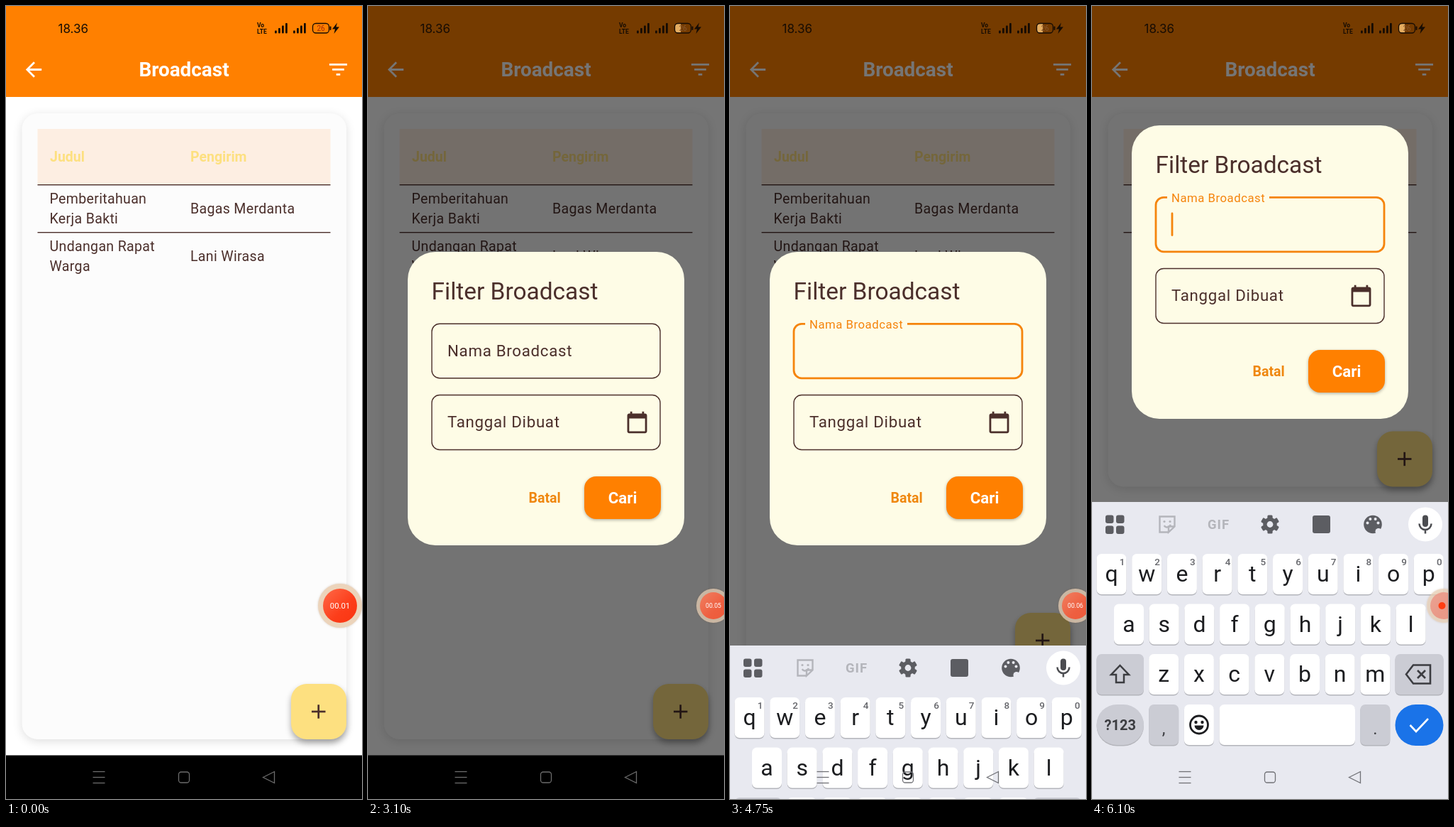
These frames come from a looping animation (502 px wide and 1116 px high, 8 s). An HTML page with a canvas:

```html
<!DOCTYPE html>
<html lang="id">
<head>
<meta charset="utf-8">
<title>Broadcast</title>
<style>
html, body { margin: 0; width: 100%; height: 100%; overflow: hidden; background: #fff; }
canvas { display: block; width: 100vw; height: 100vh; }
</style>
</head>
<body>
<canvas id="stage"></canvas>
<script>
const W = 502, H = 1116, LOOP = 8000, STEP = 50;
const DP = W / 360;
const BROWN = '#4b2f2b', ORANGE = '#ff8000', ACCENT = '#f5840c', YELLOW = '#fde080';
const KEY_GRAY = '#cbccd4', ICON = '#5c5d62', ICON_OFF = '#b4b5bb';

const canvas = document.getElementById('stage');
const dpr = window.devicePixelRatio || 1;
canvas.width = W * dpr;
canvas.height = H * dpr;
const c = canvas.getContext('2d');

const icons = {
  back: new Path2D('M20 11H7.83l5.59-5.59L12 4l-8 8 8 8 1.41-1.41L7.83 13H20v-2z'),
  filter: new Path2D('M10 18h4v-2h-4v2zM3 6v2h18V6H3zm3 7h12v-2H6v2z'),
  calendar: new Path2D('M20 3h-1V1h-2v2H7V1H5v2H4c-1.1 0-2 .9-2 2v16c0 1.1.9 2 2 2h16c1.1 0 2-.9 2-2V5c0-1.1-.9-2-2-2zm0 18H4V8h16v13z')
};

const clamp = v => Math.max(0, Math.min(1, v));
const mix = (a, b, p) => a + (b - a) * p;
const easeOut = p => 1 - (1 - p) ** 3;
const span = (t, a, b) => clamp((t - a) / (b - a));

// Piecewise linear value through [time, value] points.
function track(t, points) {
  let [t0, v0] = points[0];
  for (const [t1, v1] of points) {
    if (t < t1) return t1 === t0 ? v0 : mix(v0, v1, clamp((t - t0) / (t1 - t0)));
    [t0, v0] = [t1, v1];
  }
  return v0;
}

function text(str, x, y, size, color, { weight = 400, gap = 0, align = 'left', font = 'Roboto' } = {}) {
  c.font = `${weight} ${size}px ${font}, sans-serif`;
  c.letterSpacing = gap + 'px';
  c.textAlign = align;
  c.fillStyle = color;
  c.fillText(str, x, y);
}

function box(x, y, w, h, r, color) {
  c.fillStyle = color;
  c.beginPath();
  c.roundRect(x, y, w, h, r);
  c.fill();
}

function shadowBox(x, y, w, h, r, color, dy, blur, alpha) {
  c.save();
  c.shadowColor = `rgba(0,0,0,${alpha})`;
  c.shadowBlur = blur * dpr;
  c.shadowOffsetY = dy * dpr;
  box(x, y, w, h, r, color);
  c.restore();
}

function frame(x, y, w, h, r, color, width) {
  c.strokeStyle = color;
  c.lineWidth = width;
  c.beginPath();
  c.roundRect(x, y, w, h, r);
  c.stroke();
}

function disc(x, y, r, color) {
  c.fillStyle = color;
  c.beginPath();
  c.arc(x, y, r, 0, Math.PI * 2);
  c.fill();
}

function line(points, color, width, close) {
  c.strokeStyle = color;
  c.lineWidth = width;
  c.beginPath();
  points.forEach(([x, y]) => c.lineTo(x, y));
  if (close) c.closePath();
  c.stroke();
}

function icon(path, cx, cy, color) {
  c.save();
  c.translate(cx, cy);
  c.scale(DP, DP);
  c.translate(-12, -12);
  c.fillStyle = color;
  c.fill(path);
  c.restore();
}

function drawPage(t, shift) {
  c.fillStyle = '#fff';
  c.fillRect(0, 0, W, H);
  c.fillStyle = ORANGE;
  c.fillRect(0, 0, W, 128);
  if (t >= 1550 && t < 1700) {
    disc(468, 90, 27, 'rgba(255,255,255,.05)');
    disc(461, 99, 9, 'rgba(255,255,255,.14)');
  }
  icon(icons.back, 39, 89.5, '#fff');
  icon(icons.filter, 468.5, 89.3, '#fff');
  text('Broadcast', W / 2, 99, 20 * DP, '#fff', { weight: 700, align: 'center' });

  shadowBox(22.5, 151, 457.5, 881 + shift, 22, '#fcfcfc', 3, 14, 0.13);
  c.fillStyle = '#fdeee2';
  c.fillRect(44.5, 173, 413, 78);
  c.fillStyle = BROWN;
  c.fillRect(44.5, 251, 413, 1.4);
  c.fillRect(44.5, 318, 413, 1.4);

  const size = 14 * DP;
  text('Judul', 62, 219, size, YELLOW, { weight: 700 });
  text('Pengirim', 260, 219, size, YELLOW, { weight: 700 });
  const cell = (str, x, y) => text(str, x, y, size, BROWN, { gap: 0.25 * DP });
  cell('Pemberitahuan', 61.5, 278);
  cell('Kerja Bakti', 61.5, 306);
  cell('Bagas Merdanta', 260, 292);
  cell('Undangan Rapat', 61.5, 345);
  cell('Warga', 61.5, 373);
  cell('Lani Wirasa', 260, 359);

  const y = 993 + shift;
  shadowBox(402, y - 39, 78, 78, 22, YELLOW, 5, 9, 0.33);
  line([[431, y], [450.5, y]], BROWN, 2.7);
  line([[440.7, y - 9.7], [440.7, y + 9.7]], BROWN, 2.7);
}

function drawStatus(dimmed) {
  const ink = '#160c04';
  text('18.36', 73.5, 37.5, 17, ink, { font: 'Inter' });
  text('Vo', 354, 30, 8.5, ink, { weight: 700 });
  text('LTE', 354, 39, 8.5, ink, { weight: 700 });
  for (const x of [379, 405])
    for (let i = 0; i < 4; i++) {
      const h = 4 + i * 3.5;
      box(x + i * 5, 38.5 - h, 2.8, h, 1, ink);
    }
  if (dimmed) box(433, 25, 8, 12.5, [4, 0, 0, 4], '#e5ad60');
  frame(432.5, 24.5, 23, 13.5, 4.5, ink, 1.3);
  box(456.5, 28.5, 2, 5.5, 1, ink);
  text('26', 444, 35, 10, dimmed ? '#8a5a32' : '#a72a05', { align: 'center' });
  c.fillStyle = ink;
  c.beginPath();
  [[467, 23.5], [460, 32.5], [464, 32.5], [462.5, 39], [470, 29.5], [465.5, 29.5]].forEach(p => c.lineTo(...p));
  c.fill();
}

function drawNav(color) {
  for (const y of [1077.5, 1085.5, 1093.5]) line([[122.5, y], [139.5, y]], color, 1.3);
  frame(243.5, 1078, 15, 15, 3.5, color, 1.3);
  line([[362.5, 1085.5], [378.5, 1077.5], [378.5, 1093.5]], color, 1.3, true);
}

function drawDialog(t, shift) {
  c.save();
  c.translate(0, shift);
  box(56, 346, 390, 413, 39, '#fefce6');
  text('Filter Broadcast', 89.5, 413, 24 * DP, BROWN);

  const focus = easeOut(span(t, 4150, 4350));
  const active = focus > 0;
  frame(90, 447.3, 322, 76.5, 11, active ? ACCENT : BROWN, active ? 2.8 : 1.4);
  if (active) {
    const half = 72 * focus;
    c.fillStyle = '#fefce6';
    c.fillRect(178 - half, 445, half * 2, 5);
  }
  const scale = mix(1, 0.75, focus);
  text('Nama Broadcast', 112, mix(492.5, 453.5, focus), 16 * DP * scale, active ? ACCENT : BROWN,
    { gap: 0.5 * DP * scale });

  const on = (t >= 4250 && t < 4750) || (t >= 5100 && t < 5600) || t >= 6100;
  if (on) box(111.6, 468.5, 2.8, 33.5, 1.4, ACCENT);

  frame(90, 547.5, 322, 77, 11, BROWN, 1.4);
  text('Tanggal Dibuat', 112, 593, 16 * DP, BROWN, { gap: 0.5 * DP });
  icon(icons.calendar, 379.5, 586, BROWN);

  text('Batal', 226.5, 699, 14 * DP, '#ef870f', { weight: 700 });
  shadowBox(305, 662, 108, 60, 16.7, ORANGE, 1.5, 4, 0.3);
  text('Cari', 359, 699.5, 16 * DP, '#fff', { weight: 700, align: 'center' });
  c.restore();
}

function key(x, y, w, color = '#fff', r = 7) {
  box(x, y + 1.5, w, 57, r, '#b4b5bb');
  box(x, y, w, 57, r, color);
}

function drawToolbar() {
  const y = 31.5;
  for (const dx of [-13, 2]) for (const dy of [-13, 2]) box(32 + dx, y + dy, 11.5, 11.5, 3, ICON);

  line([[108, y + 11], [95.5, y + 11], [95.5, y - 11], [116.5, y - 11], [116.5, y + 3], [108, y + 11], [108, y + 3], [116.5, y + 3]], ICON_OFF, 2.4);
  disc(102, y - 4, 1.6, ICON_OFF);
  disc(110, y - 4, 1.6, ICON_OFF);
  c.beginPath();
  c.arc(106, y - 1, 5, 0.3, 2.6);
  c.stroke();

  text('GIF', 178.5, y + 6.5, 18.5, ICON_OFF, { weight: 700, gap: 1, align: 'center' });

  c.save();
  c.translate(251, y);
  for (let i = 0; i < 6; i++) {
    c.rotate(Math.PI / 3);
    box(-3.6, -13, 7.2, 8, 1.5, ICON);
  }
  c.restore();
  disc(251, y, 9.8, ICON);
  disc(251, y, 4.4, '#e8e9f0');

  box(311, y - 12.5, 25, 25, 3, ICON);

  disc(396, y, 12.8, ICON);
  disc(404, y + 10, 4.5, '#e8e9f0');
  for (const [x, dy] of [[-7.5, -2], [-3.6, -7.5], [3.6, -7.5], [7.5, -2]]) disc(396 + x, y + dy, 2, '#e8e9f0');

  disc(470, y, 24, '#fff');
  box(466, y - 13, 8, 16.5, 4, '#4b4c50');
  c.strokeStyle = '#4b4c50';
  c.lineWidth = 2.5;
  c.beginPath();
  c.arc(470, y - 1, 8.5, 0, Math.PI);
  c.moveTo(470, y + 7);
  c.lineTo(470, y + 13);
  c.stroke();
}

function drawKeyboard(top) {
  if (top >= H) return;
  const ink = '#1c1d20', pitch = 49.7;
  c.save();
  c.translate(0, top);
  c.fillStyle = '#e8e9f0';
  c.fillRect(0, 0, W, 420);
  drawToolbar();

  [['qwertyuiop', 6.5, 73], ['asdfghjkl', 31, 143.5], ['zxcvbnm', 80.2, 214]].forEach(([letters, x0, y], row) => {
    [...letters].forEach((ch, i) => {
      const x = x0 + i * pitch;
      key(x, y, 42);
      text(ch, x + 21, y + 39, 32, ink, { align: 'center' });
      if (row === 0) text((i + 1) % 10, x + 36, y + 15.5, 13.5, '#65666b', { weight: 500, align: 'center' });
    });
  });

  key(6.5, 214, 66.5, KEY_GRAY);
  line([[39.5, 230], [52, 243], [45, 243], [45, 254], [34, 254], [34, 243], [27, 243]], '#3c3d41', 2.5, true);
  key(427.5, 214, 68, KEY_GRAY);
  line([[443, 242.5], [453, 229.5], [477, 229.5], [477, 255.5], [453, 255.5]], '#3c3d41', 2.6, true);
  line([[459, 237], [470, 248]], '#3c3d41', 2.6);
  line([[470, 237], [459, 248]], '#3c3d41', 2.6);

  const y = 285;
  key(6.5, y, 66.5, KEY_GRAY, 28.5);
  text('?123', 39.8, y + 36, 20, '#3c3d41', { weight: 700, align: 'center' });
  key(80.2, y, 42, KEY_GRAY);
  text(',', 101, y + 42, 24, '#3c3d41', { align: 'center' });
  key(129.9, y, 42);
  frame(138.5, y + 16, 25, 25, 12.5, ink, 2.8);
  disc(146.5, y + 25, 2.2, ink);
  disc(155.5, y + 25, 2.2, ink);
  c.beginPath();
  c.arc(151, y + 29.5, 6.5, 0, Math.PI);
  c.fill();
  key(179.5, y, 191.5);
  key(378.3, y, 42, KEY_GRAY);
  text('.', 399.3, y + 42, 24, '#3c3d41', { align: 'center' });
  box(427.5, y, 68, 58, 29, '#1a73e8');
  line([[448.5, y + 29], [457, y + 38], [474, y + 20]], '#fff', 2.6);
  c.restore();
  drawNav(top > 900 ? 'rgba(255,255,255,.45)' : '#707176');
}

function drawBubble(t) {
  const docked = t >= 5400;
  const big = t < 5250 ? 1 - easeOut(span(t, 0, 300)) : 1 - span(t, 5250, 5450);
  const x = mix(docked ? 496 : 487, 471, big), y = 844;
  const inner = mix(19, 24, big), outer = mix(24, 31, big);

  c.save();
  c.globalAlpha = mix(0.72, 1, big);
  c.shadowColor = 'rgba(120,70,30,.25)';
  c.shadowBlur = 3 * dpr;
  disc(x, y, outer, '#ecd4bb');
  c.shadowBlur = 0;
  const g = c.createLinearGradient(x - inner, y - inner, x + inner, y + inner);
  g.addColorStop(0, docked ? '#ee8f80' : '#ff6a48');
  g.addColorStop(0.6, docked ? '#ea8272' : '#fc3d1a');
  g.addColorStop(1, docked ? '#ea8272' : '#fa3510');
  disc(x, y, inner, g);
  c.restore();

  if (docked) {
    disc(x - 2.5, y, 5, '#ff3d12');
    return;
  }
  const ticks = [50, 1000, 2050, 3100, 4050, 5100];
  const sec = 1 + ticks.filter(at => t >= at).length;
  text('00.0' + sec, x, y + mix(3.2, 4, big), mix(8.8, 11.3, big), '#fff', { align: 'center' });
}

function draw(t) {
  const open = t >= 1700;
  const keyTop = track(t, [[4400, H], [4600, 1025], [4700, 1025], [4750, 900], [4800, 790], [4850, 722], [4900, 698]]);
  const pageShift = track(t, [[4700, 0], [4750, -100], [4800, -220], [4850, -305], [4900, -346], [5000, -346], [5050, -355.5]]);
  const dialogShift = track(t, [[4850, 0], [4900, -15], [5000, -15], [5050, -140], [5100, -178]]);

  c.setTransform(dpr, 0, 0, dpr, 0, 0);
  c.lineCap = 'butt';
  drawPage(t, pageShift);
  if (open) {
    c.fillStyle = 'rgba(0,0,0,.54)';
    c.fillRect(0, 0, W, H);
    drawDialog(t, dialogShift);
  }
  drawStatus(open);
  c.fillStyle = '#000';
  c.fillRect(0, 1054.5, W, H - 1054.5);
  drawNav('#6c6c6c');
  drawKeyboard(keyTop);
  drawBubble(t);
}

const start = performance.now();
function tick() {
  const t = (performance.now() - start) % LOOP;
  draw(Math.floor(t / STEP) * STEP);
  requestAnimationFrame(tick);
}
tick();
</script>
</body>
</html>
```
